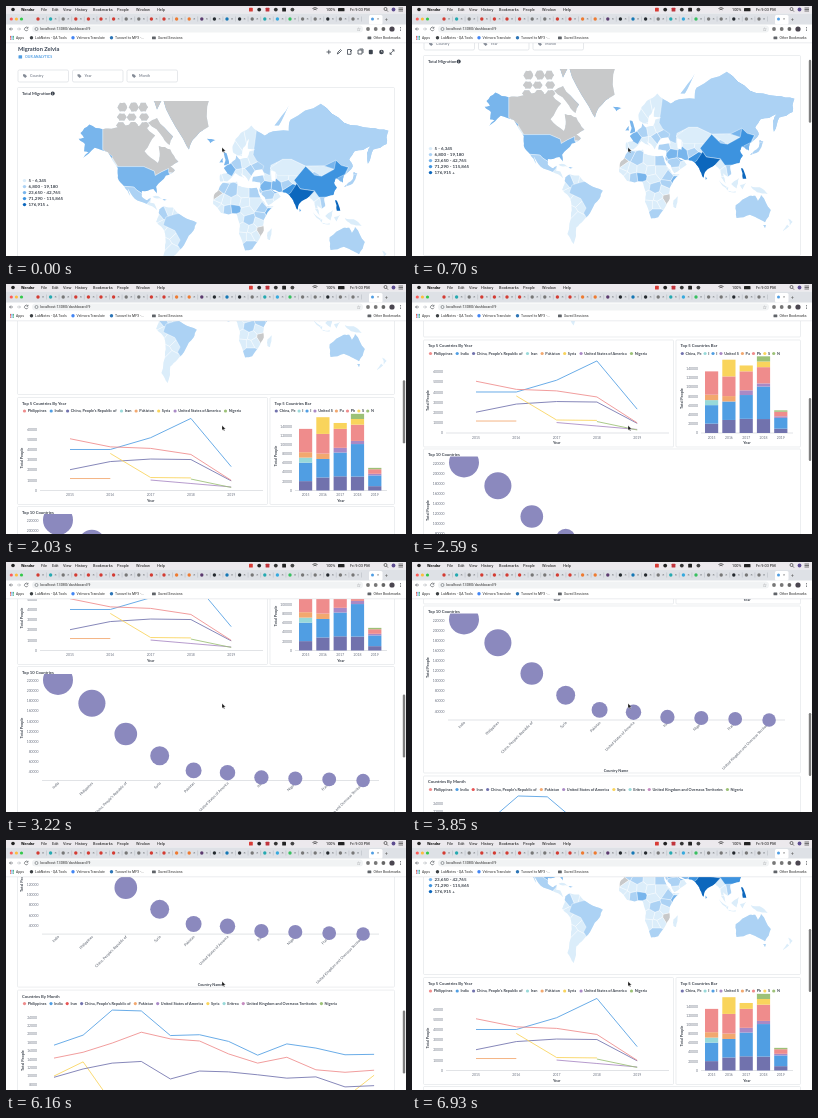
These frames come from a looping animation (400 by 250 pixels, 7000 ms). An HTML page:

```html
<!DOCTYPE html>
<html lang="en">
<head>
<meta charset="utf-8">
<title>Dashboard scroll</title>
<style>
  html, body { margin: 0; height: 100%; overflow: hidden; background: #fff; }
  svg { display: block; width: 100vw; height: 100vh; }
  text { font-family: Lato, "Open Sans", sans-serif; white-space: pre; }
  .ui text { font-family: Roboto, "Liberation Sans", sans-serif; }
</style>
</head>
<body>
<svg viewBox="0 0 400 250">
  <defs>
    <clipPath id="mapClip"><path d="M12 95H387V281H12Z"/></clipPath>
    <clipPath id="bubbleClip"><path d="M34 401H387V560H34Z"/></clipPath>
    <clipPath id="landClip"></clipPath>
  </defs>
  <g id="page"></g>
  <g id="ui" class="ui"></g>
</svg>
<script>
const byId = id => document.getElementById(id);
const page = byId("page"), ui = byId("ui");
let layer = page;

function add(tag, attrs, content) {
  const node = document.createElementNS("http://www.w3.org/2000/svg", tag);
  for (const key in attrs) node.setAttribute(key, attrs[key]);
  if (content !== undefined) node.textContent = content;
  return layer.appendChild(node);
}
// y is the vertical middle of the line of text
const text = (x, y, content, size = 3.7, fill = "#4c5773", more = {}) =>
  add("text", { x, y: y + size * .35, "font-size": size, fill, ...more }, content);
const rect = (x, y, width, height, fill, more = {}) => add("rect", { x, y, width, height, fill, ...more });
const dot = (cx, cy, r, fill, more = {}) => add("circle", { cx, cy, r, fill, ...more });
const stroke = (d, color, width = .6) =>
  add("path", { d, fill: "none", stroke: color, "stroke-width": width, "stroke-linejoin": "round" });
const bold = { "font-weight": 700 }, middle = { "text-anchor": "middle" }, end = { "text-anchor": "end" };
const range = (count, make) => Array.from({ length: count }, (_, i) => make(i));
const DARK = "#3c434d", GREY = "#848b96", AXIS = "#c3c7cc", TICK = "#6b7280";

let seed = 7;
const random = () => (seed = seed * 16807 % 2147483647) / 2147483647;
const noise = (count, mean, spread) => range(count, () => mean + (random() - .5) * 2 * spread);

// Page heading and filters
text(12, 43.3, "Migration Zelvia", 5.7, "#3c4757", bold);
rect(12.5, 49.3, 3.6, 3.2, "#509ee3", { rx: .5 });
text(19, 51, "OUR ANALYTICS", 3.5, "#509ee3", bold);
stroke("M320.5 46H325M322.8 43.8V48.2M331.3 48L332 46L334.5 43.5L335.5 44.5L333 47Z", DARK, .8);
stroke("M341.5 43.5H345V48.3H341.5ZM344 46L346 44M352 44H356V48H352ZM353.5 43H357V47", DARK, .8);
rect(362.8, 43.8, 4, 4.4, DARK, { rx: 1 });
dot(375.5, 46, 2.3, DARK);
stroke("M375.5 44.5V46H376.7", "#fff", .5);
stroke("M384 48.2L388 43.8M386 43.8H388V45.7M384 46.3V48.2H386", DARK, .7);
["Country", "Year", "Month"].forEach((name, i) => {
  const x = 12 + i * 54.5;
  rect(x, 64, 50.5, 12, "#fff", { rx: 1.5, stroke: "#d5d9de", "stroke-width": .6 });
  add("path", { d: `M${x + 5} 68.3h2l2 2l-1.8 1.8l-2.2 -2.2z`, fill: GREY });
  text(x + 12, 70, name, 3.7, GREY, bold);
});

function card(x, y, width, height, title) {
  rect(x, y, width, height, "#fff", { stroke: "#dfe2e6", "stroke-width": .6, rx: 1 });
  text(x + 4.5, y + 6, title, 4.2, DARK, bold);
}

// World map, Mercator projection
card(11.5, 81.5, 377, 200, "Total Migration");
dot(46.7, 87.5, 2, DARK);
text(46.7, 87.5, "i", 3, "#fff", { ...bold, ...middle });
const shades = ["#c8c9ca", "#dbedfa", "#acd2f4", "#78b5ec", "#3d93df", "#0c67bd"];
const parse = list => list.split(" ").map(pair => pair.split(",").map(Number));
const project = ([lon, lat]) =>
  [222.2 + .89 * lon, 211 - 51.2 * Math.log(Math.tan(Math.PI / 4 + lat * Math.PI / 360))];
const outline = points => "M" + points.map(p => p.map(v => v.toFixed(1)).join(" ")).join("L") + "Z";

// Coasts are a few corners, broken up by random midpoint displacement
const roughen = points => points.flatMap(([x, y], i) => {
  const [nx, ny] = points[(i + 1) % points.length], bend = (random() - .5) * .16;
  return [[x, y], [(x + nx) / 2 - (ny - y) * bend, (y + ny) / 2 + (nx - x) * bend]];
});
const coast = points => add("path", { d: outline(roughen(roughen(points.map(project)))) });

layer = byId("landClip");
[ // Americas
  "-141,69.6 -156,71.3 -166,68 -162,66 -168,65.5 -161,63 -162,59 -157,58.5 -164,54.6 -150,61 -135,58.5 -124,48 -124,40 -117,32.5 -110,23 -113,31 -105,20 -92,14.6 -80,7.5 -83,15 -88,16 -87,21 -91,18.5 -97,22 -97,28 -84,30 -80,25.5 -81,32 -70,42 -60,46 -65,49 -56,52.5 -65,60 -78,62 -77,56 -79,51.5 -94,59 -82,67 -95,71 -128,70",
  "-80,73.5 -62,66.5 -66,62.5 -73,66 -90,72", "-90,82 -62,82 -80,76", "-73,78.5 -60,82.5 -18,81 -22,70.5 -40,65 -44,60 -53,67",
  "-77.5,8.5 -72,12 -62,10.5 -50,0 -35,-6 -39,-15 -48,-27 -57,-37 -65,-43 -68,-55 -75,-48 -71,-30 -71,-18 -81,-5 -78,2",
  "-85,22 -80,23 -74.5,20", "-74,19.8 -69,19 -72,18",
  // Europe and Asia
  "-9,43 -1,44 -5,48 2,51 8,54 9,57 13,54 21,55 24,59 30,60 32,67 41,67 45,68 68,69 70,73 104,77.5 130,72 160,70 180,69 178,63 163,60 157,51 156,58 160,62 142,59 136,54 140,49 130,42 129,36 126,37 121,40 119,36 122,31 118,24 108,21 109,12 105,9 100,13 103,1 98,8 97,16 91,22 80,15 77.5,8 73,18 67,25 57,27 48,30 56,26 59,22 45,13 35,28 36,36 27,37 28,41 41,42 38,47 30,46 23,37 13,45 18,40 8,44 -1,37 -9,37",
  "32,60 22,60.5 23,65.5 17,61 15,56 6,58 5,62 14,68 26,71 41,67", "-24,65.5 -14,65 -20,63.4", "-5,50 1,51 -2,58 -5,58.5 -3,54", "-10,52 -6,52 -6,55",
  "52,71 68,77 57,71", "130,32 140,35 145,43.5 141,45 140,39", "120,18.5 122,18 126,7 122,7", "80,9.5 82,7 80,6",
  "109,1 117,7 115,-4", "95,5.5 106,-3 105,-6", "105,-6.5 114,-7 114,-8.5", "119,0 125,1.5 122,-5",
  // Africa and Oceania
  "-6,36 10,37 11,33 20,31 32,31 37,20 43,12 51,12 40,-3 40,-15 35,-24 27,-34 19,-35 12,-18 13,-8 9,4 -8,4.5 -17,14.5 -16,24 -10,31",
  "44,-17 49,-12.5 47,-25 44,-24", "131,-1 141,-2.6 150,-10 138,-8", "145,-41 148,-41 147,-43.5", "173,-35 178,-38 175,-41.5", "172,-40.5 174,-42 167,-46",
  "114,-22 130,-12 136,-12 139,-17.5 142.5,-11 153.5,-27 147,-38.5 138,-34.5 130,-31.5 115,-34.5"
].forEach(list => coast(parse(list)));
// Arctic islands
range(9, i => {
  const lon = -121 + i % 3 * 12 + random() * 4, lat = 71 + Math.floor(i / 3) * 2.8;
  coast(range(6, k => [lon + 5.5 * Math.cos(k * Math.PI / 3), lat + 1.3 * Math.sin(k * Math.PI / 3)]));
});

layer = page;
layer = add("g", { "clip-path": "url(#mapClip)" });
layer = add("g", { "clip-path": "url(#landClip)", stroke: "#fff", "stroke-width": .35, "stroke-linejoin": "round" });
const region = (points, shade) => add("path", { d: outline(points), fill: shades[shade] });

// Small countries: each takes the land nearest to its centre
const centres = [
  "37,-15 -13,24",
  "9,61 15,63 26,64 -4,40 -8,39 19,52 12,43 20,43 28,54 63,41 73,40 45,41 46,15 57,20 17,27 -3,18 9,17 18,15 30,15 -10,20 -13,13 -9,9 20,7 12,-1 35,-6 18,-12 27,-14 17,-22 24,-22 30,-19 47,-19 96,21 101,15 102,4 114,0 110,-7 141,-5 -75,-9 -64,-17 -58,-23 -71,-30 -65,-35 -58,5 -66,7 -79,-1 -78,21 -85,13 173,-41",
  "10,51 32,49 25,46 35,39 45,24 66,34 3,28 -6,32 30,27 39,9 38,1 23,-3 -1,8 24,-30 138,37 107,16 -73,4 84,28.5 -72,19",
  "2,47 -2,54 54,32 43,33 8,9 46,5 127.5,37 81,7",
  "69,30", "122,12"
].flatMap((list, shade) => parse(list).map(place => ({ at: project(place), shade })));

// Part of a polygon that lies closer to a than to b
function nearer(polygon, a, b) {
  const side = ([x, y]) => (x - (a[0] + b[0]) / 2) * (b[0] - a[0]) + (y - (a[1] + b[1]) / 2) * (b[1] - a[1]);
  return polygon.flatMap((p, i) => {
    const q = polygon[(i + 1) % polygon.length], sp = side(p), sq = side(q), k = sp / (sp - sq);
    const kept = sp <= 0 ? [p] : [];
    return sp * sq < 0 ? [...kept, [p[0] + (q[0] - p[0]) * k, p[1] + (q[1] - p[1]) * k]] : kept;
  });
}
for (const { at, shade } of centres) {
  let cell = [[0, 0], [400, 0], [400, 300], [0, 300]];
  for (const other of centres) if (other.at !== at) cell = nearer(cell, at, other.at);
  region(cell, shade);
}
// Large countries: land borders only, the coast does the rest
[[0, "-141,84 -141,60 -130,55 -124,49 -95,49 -83,45.5 -82,42 -75,45 -67,47.5 -67,44.5 -50,44 -40,58 -10,72 -10,84"],
 [3, "-141,75 -141,60 -130,56 -133,53 -170,52 -170,75"],
 [3, "-126,49 -95,49 -83,45.5 -82,42 -75,45 -67,47.5 -67,44.5 -65,42 -79,24 -97,25.5 -103,29 -106,31.7 -117,32.5 -125,34"],
 [2, "-118,32.5 -106,31.7 -103,29 -97,25.5 -86,23 -88,18 -92,14 -110,18"],
 [2, "-51,5 -60,3 -70,0 -73,-9 -60,-15 -54,-25 -57,-30 -53,-35 -30,-10"],
 [2, "32,70 28,57 32,53 40,49.5 38,45 47,42 48,50 61,54 71,54 87,49.3 108,49.5 121,53.5 127,50 135,48.5 131,42 165,45 185,60 185,72 105,80 40,78"],
 [1, "47,48 61,54 71,54 87,49.3 80,42 56,42"],
 [1, "87,49.3 108,49.5 119,47 105,41.5"],
 [4, "74,38 87,49.3 97,42.5 105,41.5 119,47 121,53.5 127,50 135,48.5 131,43 123,40 124,30 117,22 102,21.5 97,28 81,30"],
 [5, "77,35 70,26 67,24 72,10 78,6 82,15 90,21 97,28 81,30"],
 [2, "112,-10 143,-10 157,-27 150,-45 112,-40"]
].forEach(([shade, list]) => region(parse(list).map(project), shade));
add("path", { d: outline(parse("48,46 53,45 53,37 49,38").map(project)), fill: "#fff" });

layer = page;
["5 - 6,345", "6,800 - 19,180", "23,650 - 42,765", "71,290 - 115,865", "176,915 +"].forEach((label, i) => {
  dot(18.5, 174.6 + i * 6, 1.7, shades[i + 1]);
  text(22.5, 174.6 + i * 6, label, 4.5, DARK, bold);
});

// Chart helpers
const colors = { "China, People's Republic of": "#7172ad", India: "#509ee3", Iran: "#98d9d9", "United States of America": "#a989c5",
  Pakistan: "#f2a86f", Philippines: "#ef8c8c", Syria: "#f9d45c", Nigeria: "#9cc177", Eritrea: "#98d9d9",
  "United Kingdom and Overseas Territories": "#c58bc0" };
const CHINA = "China, People's Republic of", USA = "United States of America", UK = "United Kingdom and Overseas Territories";

function axisTitles(x, y, name, sideX, sideY) {
  text(x, y, name, 3.8, DARK, { ...bold, ...middle });
  text(0, 0, "Total People", 3.8, DARK, { ...bold, ...middle, transform: `translate(${sideX} ${sideY}) rotate(-90)` });
}
function ticks(x, yOf, from, to, step) {
  for (let v = from; v >= to; v -= step) text(x, yOf(v), v * 1000, 3.4, TICK, end);
}
function legend(x, y, names, gap = 4.8, palette = colors, label = name => name) {
  for (const name of names) {
    dot(x, y, 1.6, palette[name]);
    x += 3.2 + gap + text(x + 3.2, y, label(name), 3.85, DARK, bold).getComputedTextLength();
  }
}
const line = (values, xOf, yOf, color) => stroke(
  "M" + values.map((v, i) => [xOf(i), yOf(v)]).filter((_, i) => values[i]).map(p => p.join(" ")).join("L"), color, .85);

// Thousands of people per year, shared by the line chart and the stacked bars
const yearly = {
  [CHINA]: [20.5, 28.5, 31, 30.5, 9.5],
  India: [40.4, 40.4, 52, 71, 23.5],
  Iran: [11],
  [USA]: [0, 0, 10.3, 6.9, 3.5],
  Pakistan: [11.8, 11.8],
  Philippines: [51, 43, 41.5, 35.5, 10],
  Syria: [0, 36.5, 12.8, 12.4],
  Nigeria: [0, 0, 0, 11.3, 3]
};

// Lines by year
card(11.5, 284.5, 250, 107, "Top 5 Countries By Year");
legend(18.5, 298, ["Philippines", "India", CHINA, "Iran", "Pakistan", "Syria", USA, "Nigeria"]);
const yearX = i => 64 + i * 40.3, yearY = v => 377.5 - v * 1.015;
ticks(31, yearY, 60, 0, 10);
stroke("M34 377.5H257", AXIS, .5);
range(5, i => text(yearX(i), 382, 2015 + i, 3.4, TICK, middle));
axisTitles(144.6, 387.2, "Year", 15.5, 345);
for (const name in yearly) line(yearly[name], yearX, yearY, colors[name]);

// Stacked bars
card(264, 284.5, 124.5, 107, "Top 5 Countries Bar");
legend(270.3, 298, [CHINA, "Iran", "India", USA, "Pakistan", "Philippines", "Syria", "Nigeria"], 3.6, colors,
  name => name === CHINA ? "China, Pe" : name === USA ? "United S" : name.slice(0, name[0] === "P" ? 2 : 1));
const PER_THOUSAND = .4575;
ticks(286, v => 377.5 - v * PER_THOUSAND, 140, 0, 20);
stroke("M289 377.5H381", AXIS, .5);
range(5, i => {
  const x = 293 + i * 17.3;
  let y = 377.5;
  for (const name in yearly) {
    const height = (yearly[name][i] || 0) * PER_THOUSAND;
    rect(x, y -= height, 13.2, height, colors[name]);
  }
  text(x + 6.6, 382, 2015 + i, 3.4, TICK, middle);
});
axisTitles(335, 387.2, "Year", 270, 343);

// Bubbles by country, thousands of people
card(11.5, 393.5, 377, 167, "Top 10 Countries");
const bubbleX = i => 52 + i * 33.9, bubbleY = v => 519.1 - v * .505;
ticks(32.5, bubbleY, 220, 40, 20);
stroke("M36 507.5H373", AXIS, .5);
const totals = Object.entries({ India: 222, Philippines: 176, [CHINA]: 115, Syria: 72, Pakistan: 43, [USA]: 38.5, Iran: 29, Nigeria: 27, France: 25, [UK]: 23 });
totals.forEach(([name], i) => text(0, 0, name, 3.7, "#555c68",
  { ...end, transform: `translate(${bubbleX(i) + .5} 509.5) rotate(-45)` }));
totals.forEach(([, v], i) => dot(bubbleX(i), bubbleY(v), Math.sqrt(25 + .9 * v), "#8b89be", { "clip-path": "url(#bubbleClip)" }));
axisTitles(204, 558, "Country Name", 16, 455);

// Lines by month, thousands of people
card(11.5, 563.5, 377, 160, "Countries By Month");
const monthColors = { ...colors, Iran: "#e75454" };
legend(18.5, 577, ["Philippines", "India", "Iran", CHINA, "Pakistan", USA, "Syria", "Eritrea", UK, "Nigeria"], 4.6, monthColors);
const monthX = i => 48 + i * 29.1, monthY = v => 691.2 - v * 4.175;
ticks(31, monthY, 24, 0, 2);
stroke("M34 691.5H382", AXIS, .5);
"January February March April May June July August September October November December".split(" ")
  .forEach((name, i) => text(monthX(i), 696.5, name, 3.4, TICK, middle));
axisTitles(208, 713, "Month", 16.5, 634);
const monthly = {
  Eritrea: noise(12, 2.3, .7), Nigeria: noise(12, 2.4, .8), Iran: noise(12, 2.1, .7), Pakistan: noise(12, 3, 1), [USA]: noise(12, 3, 1),
  Syria: [10, 13.4, ...noise(9, 4, 1), 10.2],
  [CHINA]: [9.7, 11.7, 13.1, 13.5, 9.3, 11.2, 11, 10.3, 9.5, 9.8, 7.4, 7.7],
  Philippines: [14.3, 15.7, 17.9, 20.5, 18.9, 18.4, 15.3, 13.1, 14.5, 11.5, 10.9, 11.4],
  India: [17.4, 19.8, 25.8, 25.6, 19.7, 19.9, 18.3, 15, 17.7, 16.7, 15.1, 15.2]
};
for (const name in monthly) line(monthly[name], monthX, monthY, monthColors[name]);

// Menu bar
layer = ui;
rect(0, 0, 400, 37, "#fff");
rect(0, 0, 400, 7.5, "#ece9ed");
dot(7, 3.5, 1.8, "#222");
text(15, 3.5, "Wendar", 3.9, "#111", bold);
[[35, "File"], [46, "Edit"], [57, "View"], [69, "History"], [87, "Bookmarks"], [111, "People"], [130, "Window"], [151, "Help"]]
  .forEach(([x, name]) => text(x, 3.5, name, 3.9, "#111"));
["#d83b35", "#222", "#c0343c", "#333", "#222", "#444"].forEach((color, i) =>
  rect(243 + i * 8.3, 1.7, 3.8, 3.8, color, { rx: i % 2 ? 1.9 : .6 }));
stroke("M306.5 2.5Q309 .8 311.5 2.5M307.5 3.8Q309 2.6 310.5 3.8", "#222", .7);
text(320, 3.5, "100%", 3.8, "#111");
rect(332, 2.1, 6.5, 3.2, "#222", { rx: .6 });
text(344, 3.5, "Fri 9:03 PM", 3.9, "#111");
stroke("M378 3a1.5 1.5 0 1 0 3 0a1.5 1.5 0 1 0-3 0M380.6 4.1L382 5.6", "#222", .6);
dot(387.5, 3.5, 1.9, "#5d4c90");
stroke("M392.5 2H397M392.5 3.5H397M392.5 5H397", "#222", .6);

// Tabs
rect(0, 7.5, 400, 11, "#dee1e6");
["#fc5b57", "#fdbc40", "#34c84a"].forEach((color, i) => dot(5.3 + i * 5.1, 13, 1.6, color));
const icon = { r: "#d33b32", t: "#25a9b0", g: "#777", o: "#ee7a30", p: "#5b3a6e", k: "#24292e", b: "#1477b5", s: "#36a9de", w: "#38bf60" };
[..."rtgrrrrggrroopkbkgtswggkgg"].forEach((key, i) => {
  const x = 32 + i * 12.6;
  dot(x, 13, 1.7, icon[key]);
  text(x + 4, 13, "×", 4, "#62666b");
  stroke(`M${x + 8.5} 10.5V15.5`, "#a8adb3", .4);
});
rect(363, 9, 13.5, 9.5, "#fff", { rx: 1.5 });
dot(366.5, 13, 1.5, "#509ee3");
text(371, 13, "×", 4, "#555");
text(379, 13, "+", 5, "#555");

// Toolbar and bookmarks
const TOOL = "#5f6368";
stroke("M7 23H3.5M5 21.5L3.5 23L5 24.5", TOOL, .7);
stroke("M11 23H14.5M13 21.5L14.5 23L13 24.5", "#b6b9bd", .7);
stroke("M21.8 22A1.8 1.8 0 1 0 22 23.6M22 20.8V22.2H20.5", TOOL, .7);
rect(26, 19.5, 331, 7, "#f1f3f4", { rx: 3.5 });
dot(30.5, 23, 1.5, "none", { stroke: TOOL, "stroke-width": .6 });
text(34, 23, "localhost:13080/dashboard/9", 3.8, "#333");
text(350.5, 23, "☆", 5, TOOL);
["#777", "#777", "#666"].forEach((color, i) => dot(362 + i * 7.7, 23, 1.9, color));
dot(386, 23, 2.6, "#4b4650");
[-1.5, 0, 1.5].forEach(dy => dot(394.5, 23 + dy, .5, TOOL));
range(9, i => rect(4 + i % 3 * 1.4, 29.9 + Math.floor(i / 3) * 1.4, 1, 1, ["#de5246", "#4285f4", "#0f9d58"][i % 3]));
text(10, 31.8, "Apps", 3.5, "#333");
[[25.5, "#3c4043", "LabNotes - QA Tools"], [67, "#4285f4", "Velmora Translate"], [105.5, "#2d75b6", "Tunovel to MP3 -…"]].forEach(([x, color, name]) => {
  dot(x, 31.8, 1.7, color);
  text(x + 3.6, 31.8, name, 3.5, "#333");
});
[[147.5, "Saved Sessions"], [363, "Other Bookmarks"]].forEach(([x, name]) => {
  rect(x - 1.5, 30.4, 3.8, 2.8, TOOL, { rx: .5 });
  text(x + 4.5, 31.8, name, 3.5, "#333");
});
stroke("M0 36.8H400", "#d9dbde", .5);

const thumb = rect(396.8, 44, 2.4, 63, "#808080", { rx: 1.2 });
add("path", { d: "M216 141.5V146.3L217.2 145.2L218 147L218.8 146.6L218 144.9H219.6Z", fill: "#111", stroke: "#fff", "stroke-width": .3 });

const LOOP = 7000, STEP = 70, BOTTOM = 483, TURN = 5600;
const scrollKeys = [[0, 0], [420, 0], [980, 64], [1120, 64], [1470, 113.5], [2590, 228.5], [3850, 349.5], [4900, 437.5], [5530, BOTTOM], [TURN, BOTTOM]];

function scrollAt(t) {
  if (t >= TURN) return BOTTOM - 336 * ((t - TURN) / 1330) ** 1.82;
  const next = scrollKeys.findIndex(([time]) => time > t);
  const [t0, y0] = scrollKeys[next - 1], [t1, y1] = scrollKeys[next];
  return y0 + (y1 - y0) * (t - t0) / (t1 - t0);
}
const start = performance.now();
function draw() {
  const t = Math.floor((performance.now() - start) % LOOP / STEP) * STEP;
  const y = scrollAt(t);
  page.setAttribute("transform", `translate(0 ${-y})`);
  thumb.setAttribute("y", 44 + y * .306);
  thumb.setAttribute("opacity", t < 350 ? 0 : 1);
  requestAnimationFrame(draw);
}
draw();
</script>
</body>
</html>
```
